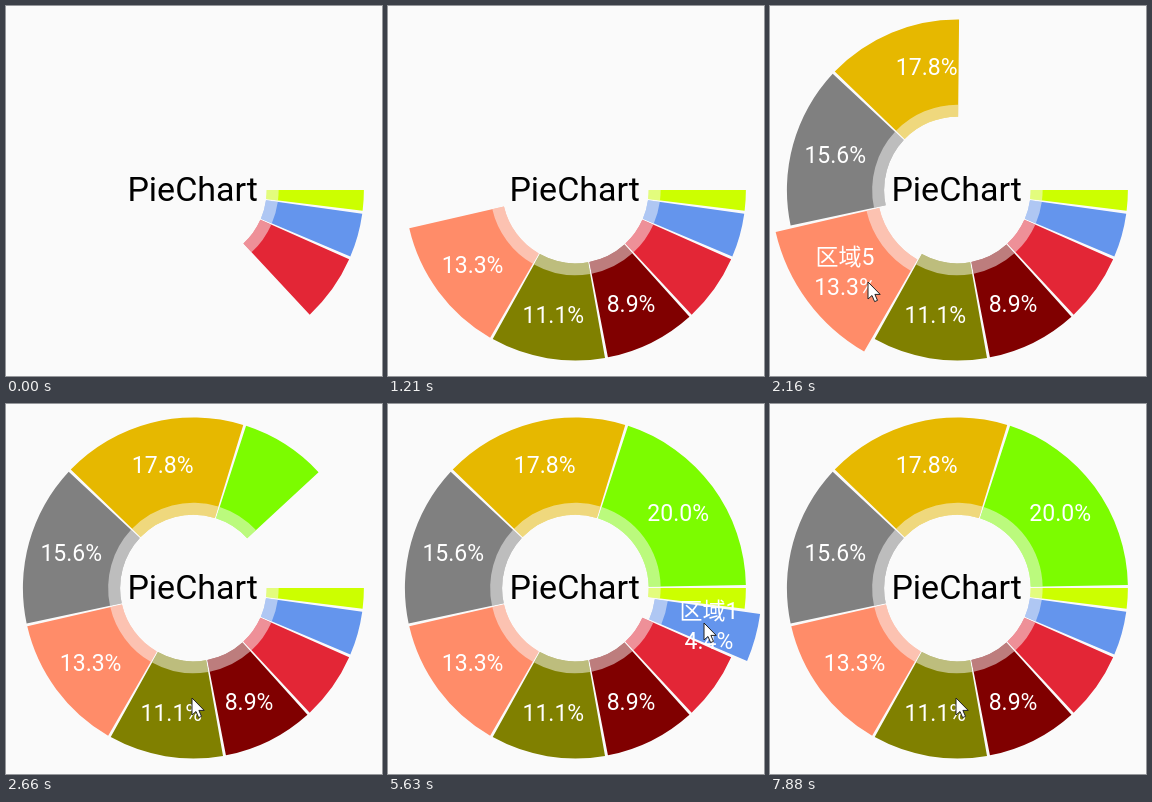
These frames come from a looping animation (376x370 px, 8000 ms). An HTML page:

```html
<!DOCTYPE html>
<html>
<head>
<meta charset="utf-8">
<style>
  html, body { margin: 0; width: 100%; height: 100%; overflow: hidden; background: #fafafa; }
  svg { display: block; width: 376px; height: 370px; }
  text { font-family: Roboto, "Noto Sans CJK SC", "Noto Sans CJK", sans-serif; font-size: 23px; text-anchor: middle; fill: #fff; }
  #title { font-size: 34px; fill: #000; }
</style>
</head>
<body>
<svg viewBox="0 0 376 370">
  <g id="slices"></g>
  <g id="labels"></g>
  <text id="title" x="186.7" y="195">PieChart</text>
  <path id="cursor" d="M0 0V17L4 13.5L6.6 19.6L9.5 18.4L6.9 12.4H12.2Z" fill="#fff" stroke="#222"/>
</svg>
<script>
const LOOP = 8000, STEP = 133;
const CX = 187.4, CY = 184, OUTER = 170.5;
const RING = OUTER / 2, HOLE = OUTER * .43, LABEL = OUTER * .745, POP = 1.094;
const COLORS = ['#ccff00', '#6495ed', '#e32636', '#800000', '#808000', '#ff8c69', '#808080', '#e6b800', '#7cfc00'];

// The pointer rests at each stop from `at` to `until`, pressing `slice` if there is one.
const STOPS = [
  { at: 1300, until: 1300, x: 110, y: 372 },
  { at: 1850, until: 2280, x: 98, y: 276, slice: 5 },
  { at: 2550, until: 2950, x: 186, y: 294 },
  { at: 3857, until: 3857, x: 304, y: 216 },
  { at: 4500, until: 5060, x: 318, y: 191, slice: 0 },
  { at: 5630, until: 6040, x: 316, y: 219, slice: 1 },
  { at: 6470, until: 6900, x: 300, y: 277, slice: 2 },
  { at: 7330, until: 7760, x: 245, y: 300, slice: 3 },
  { at: 7840, until: LOOP, x: 186, y: 294 }
];

const byId = id => document.getElementById(id);
const easeOut = k => 1 - (1 - k) ** 3;

function add(parent, tag, attrs = {}) {
  const node = document.createElementNS('http://www.w3.org/2000/svg', tag);
  for (const key in attrs) node.setAttribute(key, attrs[key]);
  return parent.appendChild(node);
}

function show(node, on) {
  node.setAttribute('visibility', on ? 'visible' : 'hidden');
}

function place(node, x, y) {
  node.setAttribute('x', x);
  node.setAttribute('y', y);
}

function polar(r, deg) {
  const a = deg * Math.PI / 180;
  return [CX + r * Math.cos(a), CY + r * Math.sin(a)];
}

function sector(r0, r1, from, to) {
  if (to <= from) return '';
  return `M${polar(r1, from)}A${r1} ${r1} 0 0 1 ${polar(r1, to)}` +
    `L${polar(r0, to)}A${r0} ${r0} 0 0 0 ${polar(r0, from)}Z`;
}

function sweepAt(t) {
  const phase = Math.min(1, .2353 + t / 4920);
  return 180 * (1 - Math.cos(Math.PI * phase));
}

function pointerAt(t) {
  const next = STOPS.findIndex(stop => stop.until > t);
  const b = STOPS[next], a = STOPS[Math.max(0, next - 1)];
  const k = t >= b.at ? 1 : easeOut((t - a.until) / (b.at - a.until));
  return [a.x + (b.x - a.x) * k, a.y + (b.y - a.y) * k];
}

// Each slice is 8 degrees wider than the one before it.
const slices = COLORS.map((fill, i) => {
  const from = 4 * i * (i + 1), size = 8 * (i + 1);
  const slice = {
    from, to: from + size - 1, mid: from + size / 2, labelled: i > 2,
    body: add(byId('slices'), 'path', { fill }),
    ring: add(byId('slices'), 'path', { fill: '#fafafa', 'fill-opacity': .5 }),
    name: add(byId('labels'), 'text'),
    value: add(byId('labels'), 'text')
  };
  slice.name.textContent = '区域' + i;
  slice.value.textContent = (size / 3.6).toFixed(1) + '%';
  return slice;
});

function render(t) {
  const tick = Math.floor((t + 2) / STEP) * STEP;
  const swept = sweepAt(tick);
  const pressed = STOPS.find(stop => t >= stop.at && t < stop.until)?.slice;

  slices.forEach((s, i) => {
    const popped = i === pressed;
    const k = popped ? POP : 1;
    const end = Math.min(s.to, swept);
    s.body.setAttribute('d', sector(HOLE * k, OUTER * k, s.from, end));
    s.ring.setAttribute('d', sector(HOLE * k, RING * k, s.from, end));

    const [x, y] = polar(LABEL * k, s.mid);
    place(s.name, x, y - 7);
    place(s.value, x, y + (popped ? 23 : 8));
    show(s.name, popped);
    show(s.value, popped || s.labelled && swept > s.mid);
  });

  const visible = tick >= STOPS[0].at;
  show(byId('cursor'), visible);
  if (visible) byId('cursor').setAttribute('transform', `translate(${pointerAt(tick)})`);
}

const start = performance.now();
function frame() {
  render((performance.now() - start) % LOOP);
  requestAnimationFrame(frame);
}
render(0);
requestAnimationFrame(frame);
</script>
</body>
</html>
```
